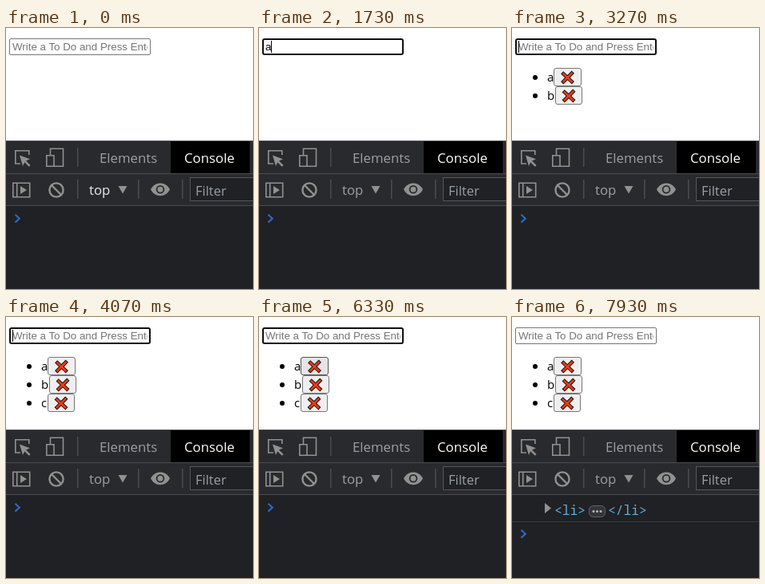
These frames come from a looping animation (309 px wide and 327 px high, 8000 ms). An HTML page:

```html
<!DOCTYPE html>
<html lang="en">
<head>
<meta charset="utf-8">
<title>To-do list</title>
<style>
html, body { margin: 0; width: 100%; height: 100%; overflow: hidden; background: #fff; }
svg { display: block; width: 309px; height: 327px; }
text { white-space: pre; }
.field { font: 13.333px "Liberation Sans", Arial, sans-serif; }
.ui { font-family: "Open Sans", "Noto Sans", sans-serif; font-size: 16.8px; fill: #9aa0a6; }
.item { font: 15px "Open Sans", "Noto Sans", sans-serif; fill: #000; }
.code { font: 16.3px "Noto Sans Mono", "DejaVu Sans Mono", monospace; fill: #5db0d7; }
.icon { fill: none; stroke: #919191; stroke-width: 1.6; }
.solid { fill: #919191; }
.rule { fill: #494c50; }
</style>
</head>
<body>
<svg viewBox="0 0 309 327">
  <defs>
    <clipPath id="inner"><rect x="8" y="14" width="169" height="19"/></clipPath>
    <g id="cross" fill="none">
      <path d="M-5.2-4.6 5.2 5.2M5.2-5.2-5.2 5.2" stroke="#1c1010" stroke-width="4.6" stroke-linecap="square"/>
      <path d="M-5.2-4.6 5.2 5.2M5.2-5.2-5.2 5.2" stroke="#f03a17" stroke-width="2.6" stroke-linecap="square"/>
    </g>
  </defs>
  <rect width="309" height="327" fill="#fff"/>

  <rect id="box" fill="#fff"/>
  <g clip-path="url(#inner)">
    <text id="hint" class="field" x="8" y="28" fill="#757575">Write a To Do and Press Enter</text>
    <text id="value" class="field" x="8" y="28"></text>
  </g>
  <rect id="caret" y="16" width="1" height="15"/>
  <g id="list"></g>

  <rect y="141" width="309" height="82" fill="#292a2d"/>
  <rect y="223" width="309" height="104" fill="#202124"/>
  <rect class="rule" y="141" width="309" height="1"/>
  <rect class="rule" y="182" width="309" height="1"/>
  <rect class="rule" y="222" width="309" height="1"/>
  <rect x="206" y="142" width="99" height="40" fill="#000"/>
  <text class="ui" x="117" y="168.5" textLength="">Elements</text>
  <text class="ui" x="223" y="168.5" style="fill:#fff">Console</text>

  <path class="icon" d="M18 170H11.8V153.8H28.8V159"/>
  <path class="solid" d="M17 159.5 30 164.2 25 166.4 30.6 172 28.8 173.8 23.2 168.2 21 173Z"/>
  <path class="icon" d="M55.5 159V151.3H71.5V173.2H60M50.8 159.8H60V173.2H50.8Z"/>
  <g class="rule">
    <rect x="89" y="150" width="1.5" height="24"/>
    <rect x="89" y="190" width="1.5" height="24"/>
    <rect x="165" y="190" width="1.5" height="24"/>
    <rect x="220" y="190" width="1.5" height="24"/>
  </g>
  <path class="icon" d="M8.8 194.3H29.7V211.7H8.8ZM13.7 194V212"/>
  <path class="solid" d="M18 198 26 203 18 208Z"/>
  <circle class="icon" cx="63" cy="203" r="8.6" style="stroke-width:2.4"/>
  <path class="icon" d="M57 197 69 209" style="stroke-width:2.4"/>
  <text id="top" class="ui" x="104" y="209">top</text>
  <path class="solid" d="M140.5 198H151.5L146 207.5Z"/>
  <path class="solid" d="M181 202.3C186 191.8 200 191.8 205 202.3 200 212.8 186 212.8 181 202.3Z"/>
  <circle cx="193" cy="202.3" r="4.4" fill="none" stroke="#292a2d" stroke-width="1.8"/>
  <rect x="230.5" y="187.5" width="90" height="29" fill="#202124" stroke="#54575b"/>
  <text class="ui" x="237" y="209.5" style="font-size:16.5px">Filter</text>

  <g id="log">
    <path class="solid" d="M41 233 49 239.5 41 246Z"/>
    <text class="code" x="53" y="248">&lt;li&gt;</text>
    <rect x="96.5" y="236.5" width="20" height="14" rx="5" fill="#343538" stroke="#5f6368"/>
    <g fill="#b4b7bb"><circle cx="102" cy="243.5" r="1.5"/><circle cx="106.5" cy="243.5" r="1.5"/><circle cx="111" cy="243.5" r="1.5"/></g>
    <text class="code" x="120" y="248">&lt;/li&gt;</text>
    <rect y="256" width="309" height="1" fill="#3a3b3e"/>
  </g>
  <path id="prompt" d="M11.5 233.8 16.7 238.7 11.5 243.6" fill="none" stroke="#3066bd" stroke-width="2.2"/>
</svg>
<script>
const LOOP = 8000, BLUR = 6930, LOGGED = 7070;
const $ = id => document.getElementById(id);
const set = (el, attrs) => { for (const k in attrs) el.setAttribute(k, attrs[k]); };
const show = (el, on) => set(el, { visibility: on ? "visible" : "hidden" });
const within = (t, spans) => spans.some(([from, to]) => t >= from && t < to);

const items = [
  { key: "a", typed: 1730, added: 2270, x: 52, w: 35 },
  { key: "b", typed: 2800, added: 3270, x: 54, w: 34 },
  { key: "c", typed: 3670, added: 4070, x: 52, w: 34 }
];
const caretOn = [[600, 1130], [1670, 2330], [2800, 3330], [3670, 4200], [4730, 5270], [5800, 6330], [6870, BLUR]];
const hovers = {
  a: [[5870, 5930], [6200, 7200]],
  b: [[5930, 6200], [7670, 7930]],
  c: []
};
const pressed = { a: [[BLUR, 7000]], b: [], c: [] };

items.forEach((it, i) => {
  const y = 50 + i * 23;
  $("list").insertAdjacentHTML("beforeend", `<g>
    <circle cx="29" cy="${y + 12}" r="3"/>
    <text class="item" x="44" y="${y + 17}">${it.key}</text>
    <rect x="${it.x + .5}" y="${y + .5}" width="${it.w - 1}" height="22" rx="2.5"/>
    <use href="#cross" x="${it.x + it.w / 2}" y="${y + 12}"/></g>`);
  it.el = $("list").lastElementChild;
  it.button = it.el.querySelector("rect");
});

function draw(t) {
  const focus = t >= 600 && t < BLUR;
  const edge = focus ? 1 : .5;
  set($("box"), {
    x: 4 + edge, y: 13 + edge, width: 177 - 2 * edge, height: 21 - 2 * edge,
    rx: focus ? 2 : 1.5, "stroke-width": 2 * edge,
    stroke: focus ? "#101010" : t >= 270 && t < 600 ? "#4f4f4f" : "#767676"
  });

  const typing = items.find(it => t >= it.typed && t < it.added);
  $("value").textContent = typing ? typing.key : "";
  show($("hint"), !typing);
  show($("caret"), within(t, caretOn));
  set($("caret"), { x: !typing ? 8 : typing.key === "c" ? 14 : 15 });

  for (const it of items) {
    show(it.el, t >= it.added);
    const [fill, stroke] = within(t, pressed[it.key]) ? ["#f5f5f5", "#8d8d8d"]
      : within(t, hovers[it.key]) ? ["#e5e5e5", "#4f4f4f"] : ["#efefef", "#767676"];
    set(it.button, { fill, stroke });
  }

  $("top").style.fill = t < 70 ? "#e8eaed" : "#9aa0a6";
  const logged = t >= LOGGED;
  show($("log"), logged);
  set($("prompt"), { transform: `translate(0 ${logged ? 33 : 0})` });
}

const start = performance.now();
function tick() {
  draw((performance.now() - start) % LOOP);
  requestAnimationFrame(tick);
}
tick();
</script>
</body>
</html>
```
